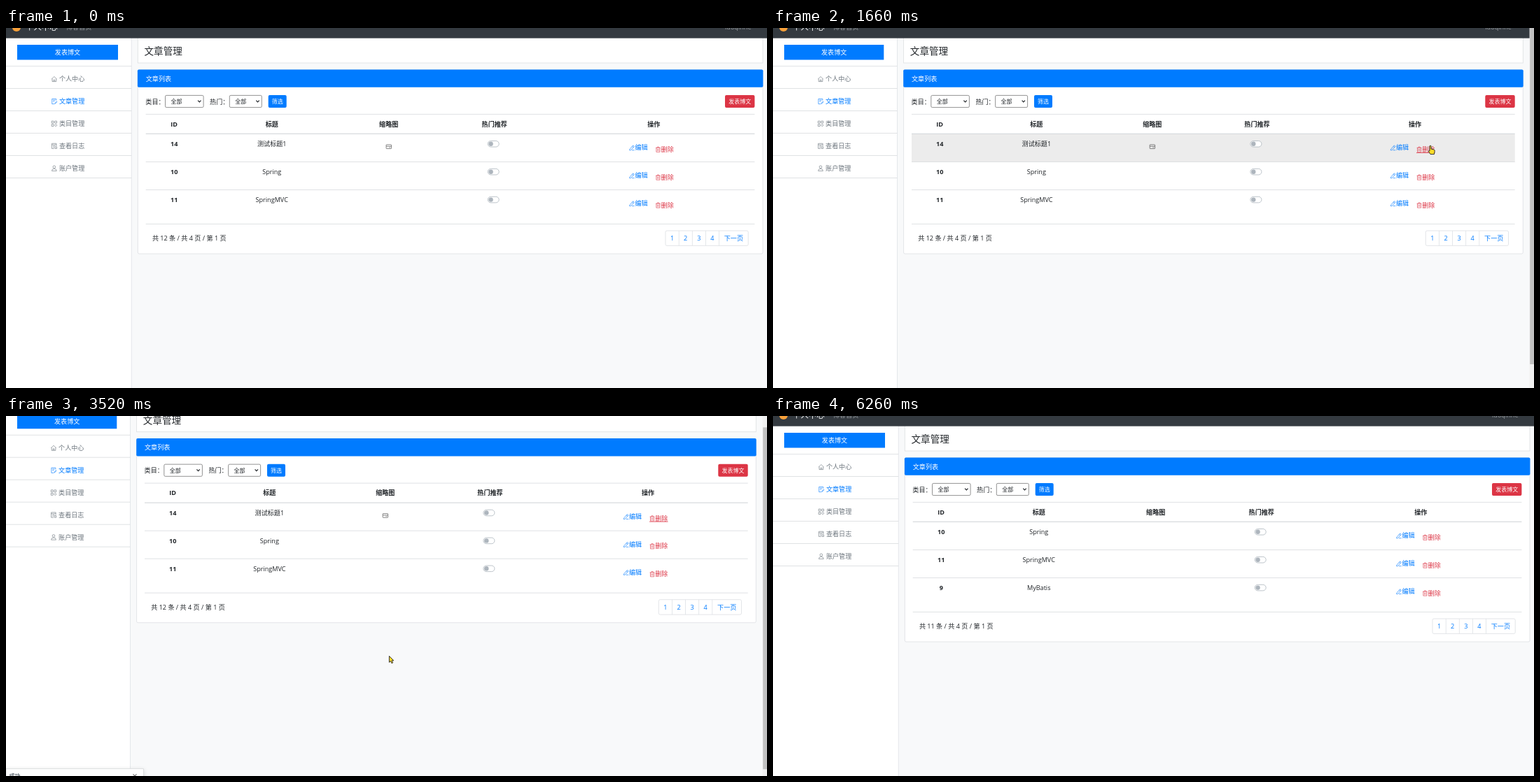
Write an HTML page that moves like this. It is 1087 by 515 pixels and loops after 7.27 s.

```html
<!DOCTYPE html>
<html lang="zh-CN">
<head>
<meta charset="utf-8">
<title>文章管理</title>
<style>
  html, body { margin: 0; width: 100%; height: 100%; overflow: hidden; background: #f8f9fa; }
  svg { display: block; }
  text { font-family: "Open Sans", "Noto Sans CJK SC", "Noto Sans CJK", sans-serif; }
</style>
</head>
<body>
<svg id="stage" width="1087" height="515" viewBox="0 0 1087 515"></svg>
<script>
const LOOP = 7270;
const BLUE = '#007bff', RED = '#dc3545', INK = '#212529', GRAY = '#6c757d', LINE = '#dee2e6';
const ROW_TOP = 151.6, ROW_H = 39.9;
const ICONS = {
  home: 'M1.5 8 8 1.8 14.5 8M3 7v7.2h10V7M6.5 14v-4h3v4',
  article: 'M13 6V1.8H2.5v12.7H8M5 5h5.5M5 8h4M9.5 14.5l.5-2 4-4.5 1 1-4 4.5z',
  grid: 'M1.5 1.5h5v5h-5zM9.5 1.5h5v5h-5zM1.5 9.5h5v5h-5zM12 9l3 3-3 3-3-3z',
  log: 'M13.5 8V1.8H2v12.7h6M2 5h11.5M5 8h5M5 11h3M10 10h4.5v4.5H10z',
  user: 'M8 1.5a3.2 3.2 0 1 1 0 6.4a3.2 3.2 0 1 1 0-6.4M2 14.7q0-5.5 6-5.5t6 5.5z',
  edit: 'M2.5 12.5 11 2.5l3 2.5-8.5 9.5H2zM9 5l3 2.5M8 14.5h6.5',
  trash: 'M2 4h12M6 4V1.8h4V4M3.5 4v10.5h9V4M6.5 6.5v5.5M9.5 6.5v5.5',
  image: 'M1.5 4q0-1 1-1h11q1 0 1 1v8q0 1-1 1h-11q-1 0-1-1zM1.5 7h13M9 10h3'
};

const rect = (x, y, w, h, fill, more = '') =>
  `<rect x="${x}" y="${y}" width="${w}" height="${h}" fill="${fill}" ${more}/>`;
const box = (x, y, w, h, stroke = '#dcdfe2', r = 2) =>
  rect(x, y, w, h, '#fff', `rx="${r}" stroke="${stroke}" stroke-width=".8"`);
const hline = (x1, x2, y, width = .8) =>
  `<path d="M${x1} ${y}H${x2}" stroke="#d8dbde" stroke-width="${width}"/>`;
// y is the vertical middle of the glyphs
const text = (x, y, str, { size = 9.1, fill = INK, anchor = 'start', more = '' } = {}) =>
  `<text x="${x}" y="${y + size * .36}" font-size="${size}" fill="${fill}" text-anchor="${anchor}" ${more}>${str}</text>`;
const mid = (x, y, str, opt = {}) => text(x, y, str, { ...opt, anchor: 'middle' });
const icon = (name, x, y, color) =>
  `<path d="${ICONS[name]}" transform="translate(${x} ${y - 4.5}) scale(.569)" fill="none" stroke="${color}" stroke-width="1.1"/>`;
const button = (x, y, w, h, label, fill, size, r = 2) =>
  rect(x, y, w, h, fill, `rx="${r}"`) + mid(x + w / 2, y + h / 2, label, { size, fill: '#fff' });
const select = (x, w) => box(x, 96.4, w, 17.2, '#767676', 1.8) +
  text(x + 8, 105, '全部', { size: 8 }) +
  `<path d="M${x + w - 8} 103.6l2.2 2.3 2.2-2.3" fill="none" stroke="${INK}" stroke-width="1.2"/>`;

function sidebar(width) {
  const items = [['home', '个人中心'], ['article', '文章管理'], ['grid', '类目管理'], ['log', '查看日志'], ['user', '账户管理']];
  const c = width / 2 - 1.3;
  let out = rect(0, 14, width, 518, '#fff') + rect(width - .4, 14, .8, 518, LINE) +
    button(16, 24, width - 35.2, 21.5, '发表博文', BLUE, 9.1, 0) + hline(0, width, 54.6);
  items.forEach(([name, label], i) => {
    const y = 73 + 31.9 * i, color = i === 1 ? BLUE : GRAY;
    out += icon(name, c - 24, y, color) + text(c - 12.4, y, label, { fill: color }) +
      hline(0, width, 86.5 + 32 * i);
  });
  return out;
}

function tableRow([id, title, image], i, col, focused) {
  const y = ROW_TOP + 14.4 + ROW_H * i, op = col(.8344), sw = col(.5727) - 10;
  let out = mid(col(.0466), y, id, { more: 'font-weight="700"' }) + mid(col(.207), y, title) +
    rect(sw + .4, y - 4.5, 16, 8.6, '#fff', 'rx="4.3" stroke="#adb5bd" stroke-width=".8"') +
    `<circle cx="${sw + 4.8}" cy="${y - .2}" r="3.2" fill="#adb5bd"/>` +
    icon('edit', op - 36, y + 5, BLUE) + text(op - 27, y + 5, '编辑', { fill: BLUE }) +
    icon('trash', op + 1.5, y + 7.6, RED) + text(op + 10.2, y + 7.6, '删除', { fill: RED });
  if (image) out += icon('image', col(.399) - 4.5, y + 3.7, '#444');
  if (focused) out += rect(op + 2, y + 12, 26.5, .8, RED);
  return out;
}

function page(rows, total, narrow) {
  const left = 188.3 - 1.7 * narrow, right = 1081 - 9.7 * narrow;
  const x0 = left + 11.4, x1 = right - 11.6;
  const col = f => x0 + f * (x1 - x0);
  const heads = [[.0466, 'ID'], [.207, '标题'], [.399, '缩略图'], [.5727, '热门推荐'], [.8344, '操作']];
  let out = rect(0, 0, 1087, 600, '#f8f9fa') + sidebar(179.2 - 1.7 * narrow) +
    box(left, 10, right - left, 40, '#dcdfe2', 0) + text(left + 9.2, 33.5, '文章管理', { size: 13.6 }) +
    rect(0, -18, 1087, 32.6, '#343a40') + '<circle cx="15" cy="-1" r="6" fill="#f9a13a"/>' +
    text(28, -1.6, '个人中心', { size: 11.4, fill: '#fff' }) +
    text(86, -1.4, '博客首页', { fill: '#999da0' }) +
    text(right - 54, -1.2, 'luoqinhe', { fill: '#999da0' });

  out += box(left, 59.6, right - left, 263.4) +
    rect(left - .4, 59.4, right - left + .8, 25.4, BLUE, 'rx="1.8"') +
    text(x0, 72.4, '文章列表', { fill: '#fff' }) +
    text(x0 - .4, 105.4, '类目：') + select(x0 + 27.8, 54.6) +
    text(x0 + 91.4, 105.4, '热门：') + select(x0 + 119.6, 46) +
    button(x0 + 175, 96, 26, 18, '筛选', BLUE, 8) +
    button(x1 - 42.4, 96, 42.4, 18, '发表博文', RED, 8);

  out += '<g class="hover"></g>' + hline(x0, x1, 123.4) + hline(x0, x1, 151.4, 1.4);
  heads.forEach(([f, label]) => out += mid(col(f), 137.4, label, { more: 'font-weight="700"' }));
  rows.forEach((row, i) => out += tableRow(row, i, col, narrow && !i));
  [191.5, 231.5, 280.4].forEach(y => out += hline(x0, x1, y));

  const p = x1 - 127.4;
  out += text(x0 + 9.2, 301, `共 ${total} 条 / 共 4 页 / 第 1 页`) + box(p, 290, 118.2, 21.4);
  for (let i = 0; i < 4; i++) {
    out += mid(p + 9.6 + 19.1 * i, 301, i + 1, { fill: BLUE }) + rect(p + 18.8 + 19.1 * i, 290, .8, 21.4, LINE);
  }
  out += mid(p + 97.4, 301, '下一页', { fill: BLUE });
  if (narrow) out += toast();
  return { out, x0, x1 };
}

const toast = () =>
  rect(0, 532, 196.5, 46, '#fff', 'stroke="#d5d7d9" stroke-width=".8" filter="url(#shadow)"') +
  text(4.5, 542.3, '成功', { size: 8, fill: GRAY, more: 'font-weight="700"' }) +
  '<path d="M181.5 539.7l5 5m0-5l-5 5" stroke="#777" stroke-width="1.2"/>' + hline(0, 196, 551, .6);

const BEFORE = [[14, '测试标题1', true], [10, 'Spring'], [11, 'SpringMVC']];
const AFTER = [[10, 'Spring'], [11, 'SpringMVC'], [9, 'MyBatis']];
const pages = [page(BEFORE, 12, 0), page(BEFORE, 12, 1), page(AFTER, 11, 0)];

const stage = document.getElementById('stage');
stage.innerHTML =
  `<defs><filter id="shadow" x="-10%" y="-30%" width="120%" height="160%">
    <feDropShadow dx="0" dy="2" stdDeviation="3" flood-opacity=".15"/></filter></defs>` +
  pages.map(p => `<g class="page">${p.out}</g>`).join('') +
  `<g id="bar">${rect(1080.6, 0, 7, 515, '#f1f1f1')}${rect(1081.2, -8, 6, 489, '#c1c1c1', 'id="thumb"')}</g>
  <g id="cursor" fill="#ffdc28" stroke="#222" stroke-width=".9" stroke-linejoin="round">
    <path id="arrow" d="M.4.4V9.4L2.4 7.6 4 10.8 5.6 10 4 6.9H6.8Z"/>
    <path id="hand" d="M-1 1Q-1 .2 0 .2T1 1V5L5.2 6Q6.4 6.4 6.2 8L5.4 12.6H0L-2.5 8.8Q-2.8 7.2-1 7.8Z"/>
  </g>`;
const find = id => document.getElementById(id);
const groups = [...stage.querySelectorAll('.page')];
const hovers = [...stage.querySelectorAll('.hover')];

// Evenly timed stops between two points
const glide = (t0, t1, n, [xa, ya], [xb, yb], ease = k => k) =>
  Array.from({ length: n }, (_, i) => {
    const k = i / (n - 1), e = ease(k);
    return [Math.round((t0 + (t1 - t0) * k) / 10) * 10, xa + (xb - xa) * e, ya + (yb - ya) * e, 'arrow'];
  });
const easeOut = k => 1 - (1 - k) ** 2;
const smooth = k => k * k * (3 - 2 * k);

const moves = [
  [0, 0, 0, ''],
  ...glide(120, 730, 9, [968, 504], [936, 187], easeOut),
  [810, 936, 184, 'arrow'], [890, 939, 180, 'arrow'],
  [1040, 941, 177, 'hand'], [1120, 941, 175, 'hand'],
  [1270, 939, 169, 'hand'], [1360, 939, 168, 'hand'],
  [2590, 939.6, 178, 'hand'],
  ...glide(2670, 2970, 5, [890, 198], [547, 340], easeOut),
  [3520, 547, 343, 'arrow'],
  ...glide(4470, 4620, 3, [548, 343], [549.5, 342]),
  ...glide(5170, 5630, 7, [556, 342], [756, 341], smooth),
  ...glide(6030, 6180, 3, [775, 345], [967, 400]),
  [6260, 0, 0, '']
];
const views = [[0, 0], [1660, 1], [3850, 2]];
const scrolls = [[0, 0], [3520, 27.3], [3610, 41], [3690, 45], [3770, 45.5], [3850, 0]];
const at = (steps, t) => steps.filter(s => s[0] <= t).pop();

function draw(t) {
  const [, x, y, kind] = at(moves, t);
  const view = at(views, t)[1], scroll = at(scrolls, t)[1];
  groups.forEach((g, i) => g.style.display = i === view ? '' : 'none');
  groups[view].setAttribute('transform', `translate(0 ${-scroll})`);

  const { x0, x1 } = pages[view];
  const row = Math.floor((y + scroll - ROW_TOP) / ROW_H);
  const over = kind && row >= 0 && y + scroll < 280 && x > x0 && x < x1;
  const i = Math.min(row, 2), height = i === 2 ? 48.8 : ROW_H;
  hovers[view].innerHTML = over ? rect(x0, ROW_TOP + ROW_H * i, x1 - x0, height, '#ececec') : '';

  find('bar').style.display = view === 1 ? '' : 'none';
  find('thumb').setAttribute('y', -8 + scroll * .89);
  for (const name of ['arrow', 'hand']) find(name).style.display = name === kind ? '' : 'none';
  find('cursor').setAttribute('transform', `translate(${x} ${y})`);
}

const start = performance.now();
function tick() {
  draw((performance.now() - start) % LOOP);
  requestAnimationFrame(tick);
}
tick();
</script>
</body>
</html>
```
